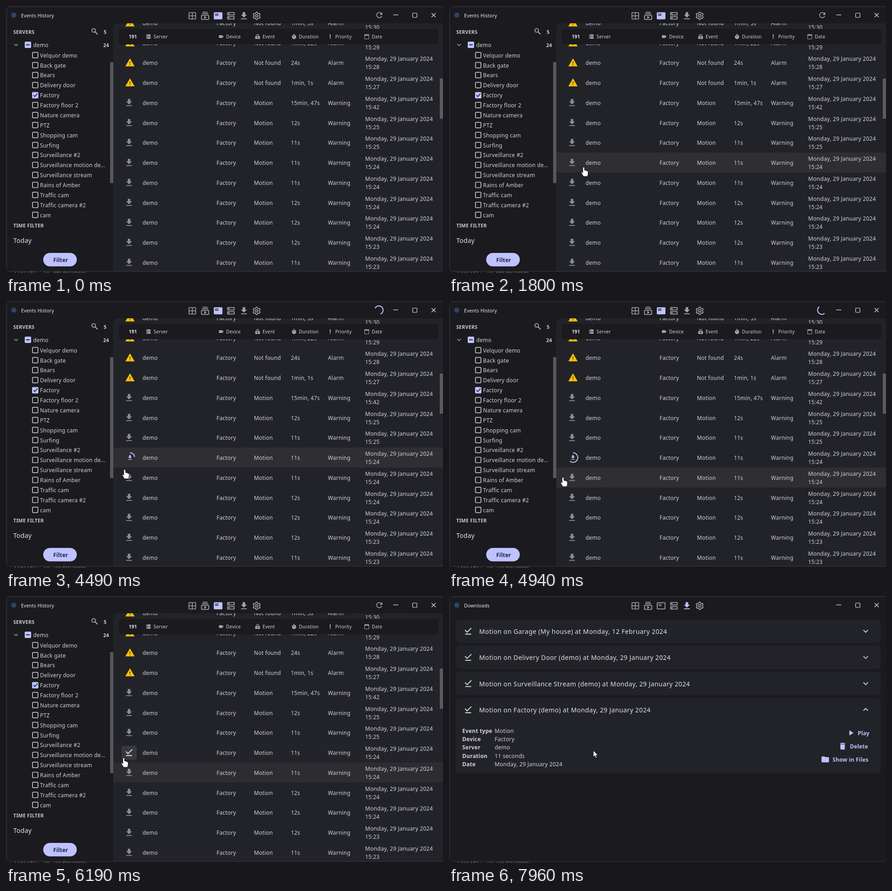
Write an HTML page that moves like this. It is 957 by 585 pixels and loops after 7990 ms.

```html
<!DOCTYPE html>
<html lang="en">
<head>
<meta charset="utf-8">
<title>Events History</title>
<style>
html, body { margin: 0; width: 100%; height: 100%; overflow: hidden; background: #18181a; }
svg { display: block; width: 957px; height: 585px; font-family: "Noto Sans", "Open Sans", sans-serif; letter-spacing: .22px; }
text { white-space: pre; }
.mono { font-family: "DejaVu Sans Mono", monospace; letter-spacing: 0; }
.wide { letter-spacing: .45px; }
</style>
</head>
<body>
<svg id="stage" viewBox="0 0 957 585"></svg>
<script>
const LOOP = 7990, ACCENT = '#bec2ff', GREY = '#a3a3a8', TEXT = '#d2d1d7', BG = '#1b1b1f', PANEL = '#222328';
const DONE = '#d8eedc', PITCH = 43.75, FIRST_ROW = 37.5, ROW_TOP = 22.6;

const ICONS = {
  download: 'M19 9h-4V3H9v6H5l7 7 7-7zM5 18v2h14v-2H5z',
  done: 'M20.1 5.4 18.7 4 9.5 13.2 5.3 8.9 3.9 10.4 9.5 16zM5 18h14v2H5z',
  warning: 'M1 21h22L12 2zM13 18h-2v-2h2zM13 14h-2v-4h2z',
  library: 'M20 8H4V6h16zM18 2H6v2h12zM22 12v8q0 2-2 2H4q-2 0-2-2v-8q0-2 2-2h16q2 0 2 2zM16 16l-6-3.3v6.6z',
  libraryOutline: 'M20 8H4V6h16zM18 2H6v2h12zM22 12v8q0 2-2 2H4q-2 0-2-2v-8q0-2 2-2h16q2 0 2 2zM20 12H4v8h16zM10 12.7v6.6L16 16z',
  card: 'M3 3h18q2 0 2 2v14q0 2-2 2H3q-2 0-2-2V5q0-2 2-2zM4 6.5v1.8h9V6.5zM4 10v1.8h9V10z',
  cardOutline: 'M3 3h18q2 0 2 2v14q0 2-2 2H3q-2 0-2-2V5q0-2 2-2zM3 5v14h18V5zM5 7.5h8v1.6H5zM5 10.6h8v1.6H5z',
  dns: 'M4 3h16q1 0 1 1v6q0 1-1 1H4q-1 0-1-1V4q0-1 1-1zM4 13h16q1 0 1 1v6q0 1-1 1H4q-1 0-1-1v-6q0-1 1-1zM5.5 5.5v3h3v-3zM5.5 15.5v3h3v-3z',
  dnsOutline: 'M4 3h16q1 0 1 1v6q0 1-1 1H4q-1 0-1-1V4q0-1 1-1zM5 5v4h14V5zM4 13h16q1 0 1 1v6q0 1-1 1H4q-1 0-1-1v-6q0-1 1-1zM5 15v4h14v-4zM6 5.7h2.6v2.6H6zM6 15.7h2.6v2.6H6z',
  grid: 'M4 2.5h16q2 0 2 2v15q0 2-2 2H4q-2 0-2-2v-15q0-2 2-2zM4 4.5v6.5h7V4.5zM13 4.5v6.5h7V4.5zM4 13v6.5h7V13zM13 13v6.5h7V13z',
  video: 'M17 10.5V7q0-1-1-1H4Q3 6 3 7v10q0 1 1 1h12q1 0 1-1v-3.5l4 4v-11z',
  timer: 'M9 1h6v2H9zM19 7.4l1.4-1.4-1.4-1.4-1.5 1.5A9 9 0 1 0 19 7.4zM11 8h2v6h-2z',
  priority: 'M10 3h4v12h-4zM10 17h4v4h-4z',
  calendar: 'M20 3h-1V1h-2v2H7V1H5v2H4Q2 3 2 5v16q0 2 2 2h16q2 0 2-2V5q0-2-2-2zM4 8h16v13H4z',
  refresh: 'M17.65 6.35A8 8 0 1 0 19.7 14h-2.1A6 6 0 1 1 16.2 7.8L13 11h7V4z',
  play: 'M8 5v14l11-7z',
  trash: 'M6 19q0 2 2 2h8q2 0 2-2V7H6zM19 4h-3.5l-1-1h-5l-1 1H5v2h14z',
  folder: 'M10 4H4Q2 4 2 6v12q0 2 2 2h16q2 0 2-2V8q0-2-2-2h-8z'
};

const icon = (name, x, y, scale, fill, extra = '') =>
  `<path ${extra} d="${ICONS[name]}" fill="${fill}" fill-rule="evenodd" transform="translate(${x} ${y}) scale(${scale}) translate(-12 -12)"/>`;
const text = (x, y, str, size = 11.95, fill = TEXT, weight = 400, cls = '') =>
  `<text x="${x}" y="${y + size * .36}" font-size="${size}" fill="${fill}" font-weight="${weight}" class="${cls}">${str}</text>`;
const rect = (x, y, w, h, fill, rx = 0, extra = '') =>
  `<rect x="${x}" y="${y}" width="${w}" height="${h}" rx="${rx}" fill="${fill}" ${extra}/>`;
const line = (d, color, width = 2, extra = '') =>
  `<path d="${d}" fill="none" stroke="${color}" stroke-width="${width}" ${extra}/>`;

function gear(cx, cy) {
  const points = Array.from({ length: 24 }, (_, i) => {
    const angle = (i - .5) * Math.PI / 12 - Math.PI / 2;
    const r = i % 4 < 2 ? 8.2 : 6.1;
    return `${(cx + r * Math.cos(angle)).toFixed(1)},${(cy + r * Math.sin(angle)).toFixed(1)}`;
  });
  return `<polygon points="${points.join(' ')}" fill="none" stroke="${GREY}" stroke-width="1.8" stroke-linejoin="round"/>
    <circle cx="${cx}" cy="${cy}" r="2.6" fill="none" stroke="${GREY}" stroke-width="1.8"/>`;
}

function titleBar() {
  return `<circle cx="17" cy="20" r="5.5" fill="#2f4567"/>
    <text id="title" x="33" y="25.2" font-size="10.3" fill="#eeedf2"></text>`
    + icon('grid', 408, 21.5, .82, GREY) + icon('libraryOutline', 436, 21.5, .88, GREY)
    + `<g id="navEvents">${icon('card', 464.5, 21.5, .86, ACCENT)}</g>`
    + `<g id="navEventsIdle">${icon('cardOutline', 464.5, 21.5, .86, GREY)}</g>`
    + icon('dnsOutline', 492.5, 21.5, .9, GREY) + icon('download', 521, 21.8, .91, GREY, 'id="navDownloads"') + gear(549, 21.5)
    + icon('refresh', 817.5, 20, .82, GREY, 'id="refresh"') + line('', ACCENT, 2, 'id="busy"')
    + line('M848 19.5h11', '#e6e6e9', 1.2)
    + rect(890.5, 15.5, 9.5, 9.5, 'none', 1.5, 'stroke="#e6e6e9" stroke-width="1.2"')
    + line('M932 15.5l9 9m0-9l-9 9', '#e6e6e9', 1.2);
}

function sidebar() {
  const cameras = ['Velquor demo', 'Back gate', 'Bears', 'Delivery door', 'Factory', 'Factory floor 2', 'Nature camera', 'PTZ',
    'Shopping cam', 'Surfing', 'Surveillance #2', 'Surveillance motion de...', 'Surveillance stream', 'Rains of Amber',
    'Traffic cam', 'Traffic camera #2', 'cam'];
  const items = cameras.map((name, i) => {
    const y = 108 + i * 21.87;
    const box = name === 'Factory'
      ? rect(57, y - 7, 14, 14, ACCENT, 2) + line(`M60 ${y}l3 3 6-6.5`, '#23264d', 1.8)
      : rect(58, y - 6.3, 12, 12, 'none', 1.5, 'stroke="#c2c1c8" stroke-width="1.7"');
    return box + text(74.5, y + .4, name);
  });
  return text(16, 57, 'SERVERS', 10.7, '#c9c8d0', 600)
    + '<circle cx="192" cy="53.5" r="4" fill="none" stroke="#b3b3b8" stroke-width="1.7"/>' + line('M195 56.5l5.5 5.5', '#b3b3b8', 2)
    + text(214, 57, '5', 10.5, TEXT, 600)
    + line('M18 83l4 4 4-4', '#9a9aa0', 1.6) + rect(41, 78, 14, 14, ACCENT, 2) + line('M44 85h8', '#23264d')
    + text(59.5, 86, 'demo') + text(213, 86, '24', 10.6, TEXT, 600)
    + items.join('') + rect(228, 123, 7, 265, '#58585c')
    + text(16, 481, 'TIME FILTER', 10.7, '#c9c8d0', 600) + text(16, 514, 'Today', 14.1, '#e4e3e8')
    + rect(81.5, 541, 73.5, 29.5, ACCENT, 14.75) + text(103.5, 557, 'Filter', 11.8, '#1b1e42', 600);
}

function eventList() {
  const rows = [['1min, 3s', '15:30'], ['1min, 22s', '15:29'], ['24s', '15:28'], ['1min, 1s', '15:27'], ['15min, 47s', '15:42'],
    ['12s', '15:25'], ['11s', '15:25'], ['11s', '15:24'], ['11s', '15:24'], ['12s', '15:24'], ['12s', '15:24'], ['12s', '15:23'], ['11s', '15:23']];
  const body = rows.map(([duration, clock], i) => {
    const y = FIRST_ROW + i * PITCH, alarm = i < 4;
    const mark = alarm ? icon('warning', 271.5, y - 1, .92, '#ffc107')
      : i === 7 ? `<g id="status"></g>` : icon('download', 269.5, y - .5, .91, '#8d8d92');
    return rect(235, y - ROW_TOP, 722, PITCH, '#2e2e33', 0, 'class="hover" opacity="0"')
      + (i === 7 ? rect(253, 328, 33, 31, '#38383d', 5, 'id="button"') : '') + mark
      + text(299, y, 'demo') + text(461, y, 'Factory') + text(543, y, alarm ? 'Not found' : 'Motion')
      + text(624, y, duration) + text(705, y, alarm ? 'Alarm' : 'Warning')
      + text(786.5, y - 9, 'Monday, 29 January 2024', 12.15) + text(786.5, y + 9, clock);
  }).join('');
  const columns = [['dns', 312, 323, 'Server'], ['video', 471, 482, 'Device'], ['library', 551, 562, 'Event'],
    ['timer', 630.5, 641.5, 'Duration'], ['priority', 710, 721, 'Priority'], ['calendar', 790, 801, 'Date']];
  return `<g clip-path="url(#listClip)">${rect(235, 38, 722, 544, PANEL)}${body}</g>`
    + rect(246, 50, 701, 34, BG, 6) + text(269, 67.3, '191', 10, '#e4e3e8', 600)
    + columns.map(([name, ix, tx, label]) => icon(name, ix, 67, .52, GREY) + text(tx, 67.3, label, 10)).join('')
    + rect(950, 159, 7, 88, '#5b5b5f');
}

function downloadsPage() {
  const titles = ['Garage (My house) at Monday, 12 February 2024', 'Delivery Door (demo) at Monday, 29 January 2024',
    'Surveillance Stream (demo) at Monday, 29 January 2024', 'Factory (demo) at Monday, 29 January 2024'];
  const details = [['Event type', 'Motion'], ['Device', 'Factory'], ['Server', 'demo'], ['Duration', '11 seconds'], ['Date', 'Monday, 29 January 2024']];
  const actions = [['play', 880, 300, 895, 'Play'], ['trash', 862, 329, 878, 'Delete'], ['folder', 824, 358, 840, 'Show in Files']];
  return rect(2, 38, 955, 543, BG) + titles.map((title, i) => {
    const y = 77 + i * 57.4, open = i === 3;
    return rect(15, y - 25.5, 930, open ? 164 : 51, PANEL, 8) + icon('done', 42, y, .93, DONE)
      + text(66, y + .8, 'Motion on ' + title, 13.9, '#e2e1e6', 400, 'wide')
      + line(open ? `M907.5 ${y + 2}l5-5 5 5` : `M907.5 ${y - 2.5}l5 5 5-5`, open ? ACCENT : '#c2c1c8', 2);
  }).join('')
    + details.map(([key, value], i) => text(29, 295.5 + i * 18.25, key, 12, TEXT, 700) + text(100, 295.5 + i * 18.25, value, 12.15)).join('')
    + actions.map(([name, ix, y, tx, label]) => icon(name, ix, y, .82, ACCENT) + text(tx, y + .8, label, 11.85, ACCENT, 600)).join('');
}

const stage = document.getElementById('stage');
stage.innerHTML = `<clipPath id="listClip"><path d="M235 50q0-12 12-12h710v543H235z"/></clipPath>
  <text id="console" class="mono" x="17" y="586" font-size="11.9" fill="#77777a"></text>
  ${rect(1.5, 1.5, 962, 580, BG, 7, 'stroke="#3b3b3f"')}
  <g id="events">${sidebar()}${eventList()}</g>
  <g id="downloads">${downloadsPage()}</g>
  ${titleBar()}
  <g id="cursor" stroke="#111" stroke-width="1" stroke-linejoin="round" fill="#fff">
    <path id="hand" d="M-2 1.5Q-2 0 0 0T1.9 1.5V7Q3.4 6 4.6 7.6 6 6.8 7 8.6 9.5 8.2 9.6 10.5V15Q9.3 18 8 20.5H-.5Q-3 16-5.2 13-5.6 11.4-4.4 11T-2 12.6z"/>
    <path id="arrow" d="M0 0V14.5L3.4 11.3 5.7 16.5 8 15.5 5.8 10.4H10.3z"/>
  </g>`;

const el = id => document.getElementById(id);
const show = (id, on) => el(id).style.display = on ? '' : 'none';
const hovers = [...stage.querySelectorAll('.hover')];
const clamp = v => Math.min(1, Math.max(0, v));

// Pointer tip: time, x, y
const PATH = [[350, 776, 583], [600, 660, 548], [750, 660, 548], [1500, 322, 364], [1550, 322, 364], [1800, 295, 353],
  [2090, 294, 336], [2630, 294, 336], [2730, 278, 347], [4300, 278, 347], [4490, 260, 369], [4600, 254, 382],
  [5400, 244, 392], [5465, 234, 403], [5590, 222, 446], [5670, 222, 446], [5900, 250, 420], [6230, 259, 346],
  [6270, 259, 346], [6430, 268, 339], [7850, 268, 339], [7960, 316, 338.5]];

function pointer(t) {
  const next = PATH.findIndex(key => key[0] > t);
  if (next < 1) return PATH[next ? PATH.length - 1 : 0].slice(1);
  const [a, b] = [PATH[next - 1], PATH[next]], p = (t - a[0]) / (b[0] - a[0]);
  return [a[1] + (b[1] - a[1]) * p, a[2] + (b[2] - a[2]) * p];
}

function hoveredRow(t) {
  const [x, y] = pointer(t);
  return t < 350 || x < 235 ? -1 : Math.floor((y - FIRST_ROW + ROW_TOP) / PITCH);
}

// cubic-bezier(.4, 0, .2, 1)
function fastOutSlowIn(x) {
  let lo = 0, hi = 1;
  for (let i = 0; i < 20; i++) {
    const s = (lo + hi) / 2;
    if (1.2 * s * (1 - s) ** 2 + .6 * s * s * (1 - s) + s ** 3 < x) lo = s; else hi = s;
  }
  return 3 * lo * lo * (1 - lo) + lo ** 3;
}

function arc(cx, cy, r, start, sweep) {
  const at = a => `${cx + r * Math.sin(a)} ${cy - r * Math.cos(a)}`;
  sweep = Math.min(sweep, 6.28);
  return `M${at(start)}A${r} ${r} 0 ${sweep > Math.PI ? 1 : 0} 1 ${at(start + sweep)}`;
}

function spinner(ms) {
  const cycle = ms / 1333 % 1, turn = ms / 2222 % 1;
  const head = fastOutSlowIn(clamp(cycle * 2)), tail = fastOutSlowIn(clamp(cycle * 2 - 1));
  return arc(816.5, 20, 9.3, Math.PI * (1.5 * tail + 2 * turn + .5 * cycle), Math.max(.12, 1.5 * Math.PI * (head - tail)));
}

function statusIcon(t) {
  if (t < 2970) return icon('download', 269.5, 343.2, .91, '#8d8d92');
  if (t >= 5400) return icon('done', 269.5, 343, .93, DONE);
  const progress = t < 4490 ? .23 * (t - 2970) / 1520 : .23 + .77 * (t - 4490) / 910;
  return icon('download', 271.5, 343, .58, ACCENT) + line(arc(271.5, 343, 10.5, 0, progress * 2 * Math.PI), '#c3c5e2', 2);
}

function draw(t) {
  const [x, y] = pointer(t), loading = t >= 2970 && t < 5400, leaving = t >= 7150;
  el('console').textContent = 'flutter: in ' + (t < 2630 ? 'background' : 'foreground');
  el('title').textContent = leaving ? 'Downloads' : 'Events History';

  show('refresh', !loading && !leaving);
  show('busy', loading);
  if (loading) el('busy').setAttribute('d', spinner((t - 2970) * 1.11));
  el('status').innerHTML = statusIcon(t);
  show('button', !loading && t > 350 && x > 253 && x < 286 && y > 328 && y < 359);

  const recent = Array.from({ length: 8 }, (_, i) => hoveredRow(t - 40 - i * 15));
  hovers.forEach((row, i) => row.setAttribute('opacity', recent.filter(r => r === i).length / 8));

  const fade = clamp((t - 7150) / 100);
  el('downloads').style.opacity = fade;
  show('events', fade < 1);
  show('navEvents', t < 7180);
  show('navEventsIdle', t >= 7180);
  el('navDownloads').setAttribute('fill', t < 7180 ? GREY : ACCENT);

  const arrow = x < 235 || t > 7850;
  show('cursor', t >= 350);
  show('hand', !arrow);
  show('arrow', arrow);
  el('cursor').setAttribute('transform', `translate(${x} ${y})`);
}

const start = performance.now();
(function tick() {
  draw((performance.now() - start) % LOOP);
  requestAnimationFrame(tick);
})();
</script>
</body>
</html>
```
